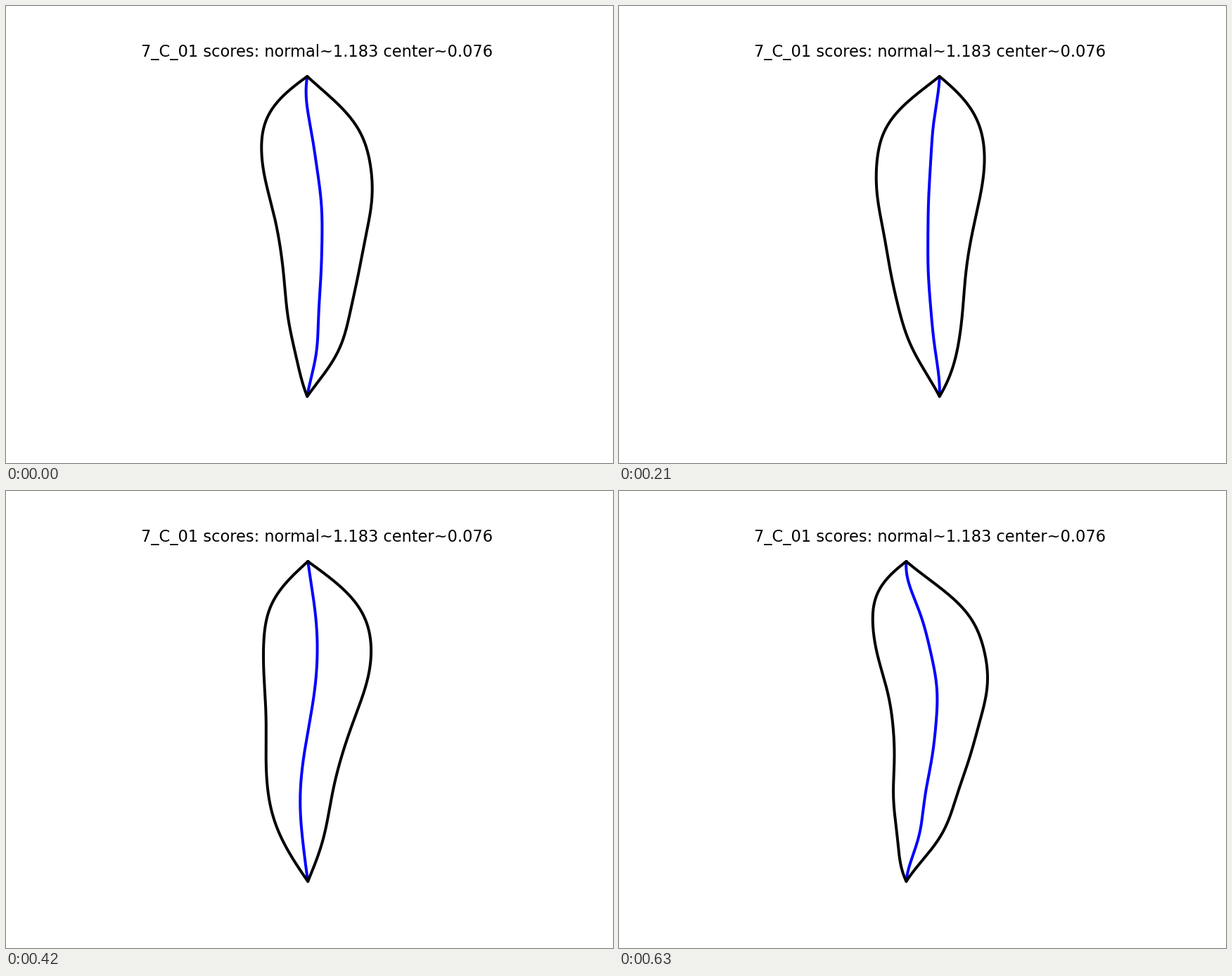
Write a matplotlib script that moves like this. It is 863x649 px and loops after 700 ms.

```python
import numpy as np
import matplotlib.pyplot as plt
from matplotlib.animation import FuncAnimation

W, H, DPI = 863, 649, 64
PX = 72 / DPI  # points per pixel
FRAMES, STEP = 10, 70
TOP, BOTTOM = 100, 554.5

# Key moments of the swaying: mean position, C-bend and S-bend of the midrib
KEY_T = [0, 2, 3, 5, 7, 8, 9]
SWAY = [440.9, 445.3, 445.3, 434.8, 428.1, 429.1, 434.2]
C_BEND = [-9.6, 1.6, 7.5, 4.3, -8.2, -15.6, -19.3]
S_BEND = [-3.0, -2.7, -0.5, 10.0, 11.6, 8.8, 2.1]


def ease(values, t):
    """Smooth cubic path through the key values."""
    m = np.gradient(values, KEY_T)
    i = min(np.searchsorted(KEY_T, t, side="right"), len(KEY_T) - 1) - 1
    h = KEY_T[i + 1] - KEY_T[i]
    u = (t - KEY_T[i]) / h
    return (values[i] + (values[i + 1] - values[i]) * u * u * (3 - 2 * u)
            + h * u * (1 - u) * (m[i] * (1 - u) - m[i + 1] * u))


def waves(fn, weights, phase):
    return sum(c * fn(k * phase) for k, c in enumerate(weights, 1))


s = np.linspace(0, 1, 300)
y = TOP + (BOTTOM - TOP) * s
half = waves(np.sin, [73.9, 17, 13.45, 2.4, 2.2, 0.8, 0.6, 0.2], np.pi * s)
turn = 2 * np.pi * s
c_shape = waves(np.cos, [1, 0.2, 0.1, 0.05], turn)
skew = waves(np.sin, [0, 1, 0.27, 0.1], turn)


def midrib(t):
    lag = 1.3 + 1.2 * np.cos(2 * np.pi * (t + 0.4) / FRAMES)
    return (ease(SWAY, t) + ease(C_BEND, t) * c_shape
            + ease(S_BEND, t) * np.sin(turn)
            + 0.3 * np.cos(2 * turn) - lag * skew)


fig = plt.figure(figsize=(W / DPI, H / DPI), dpi=DPI, facecolor="white")
ax = fig.add_axes([0, 0, 1, 1])
ax.set_xlim(0, W)
ax.set_ylim(H, 0)
ax.axis("off")

ax.text(442, 72, "7_C_01 scores: normal~1.183 center~0.076",
        family="DejaVu Sans", size=22.5 * PX, ha="center", va="baseline")
style = dict(lw=4 * PX, solid_joinstyle="round", solid_capstyle="round")
rib, = ax.plot([], [], color="blue", **style)
edge, = ax.plot([], [], color="black", **style)


def draw(i):
    mid = midrib(i % FRAMES)
    rib.set_data(mid, y)
    edge.set_data(np.concatenate([mid - half, (mid + half)[::-1]]),
                  np.concatenate([y, y[::-1]]))
    return rib, edge


anim = FuncAnimation(fig, draw, frames=FRAMES, interval=STEP,
                     repeat=True, repeat_delay=0, blit=False)
plt.show()
```
